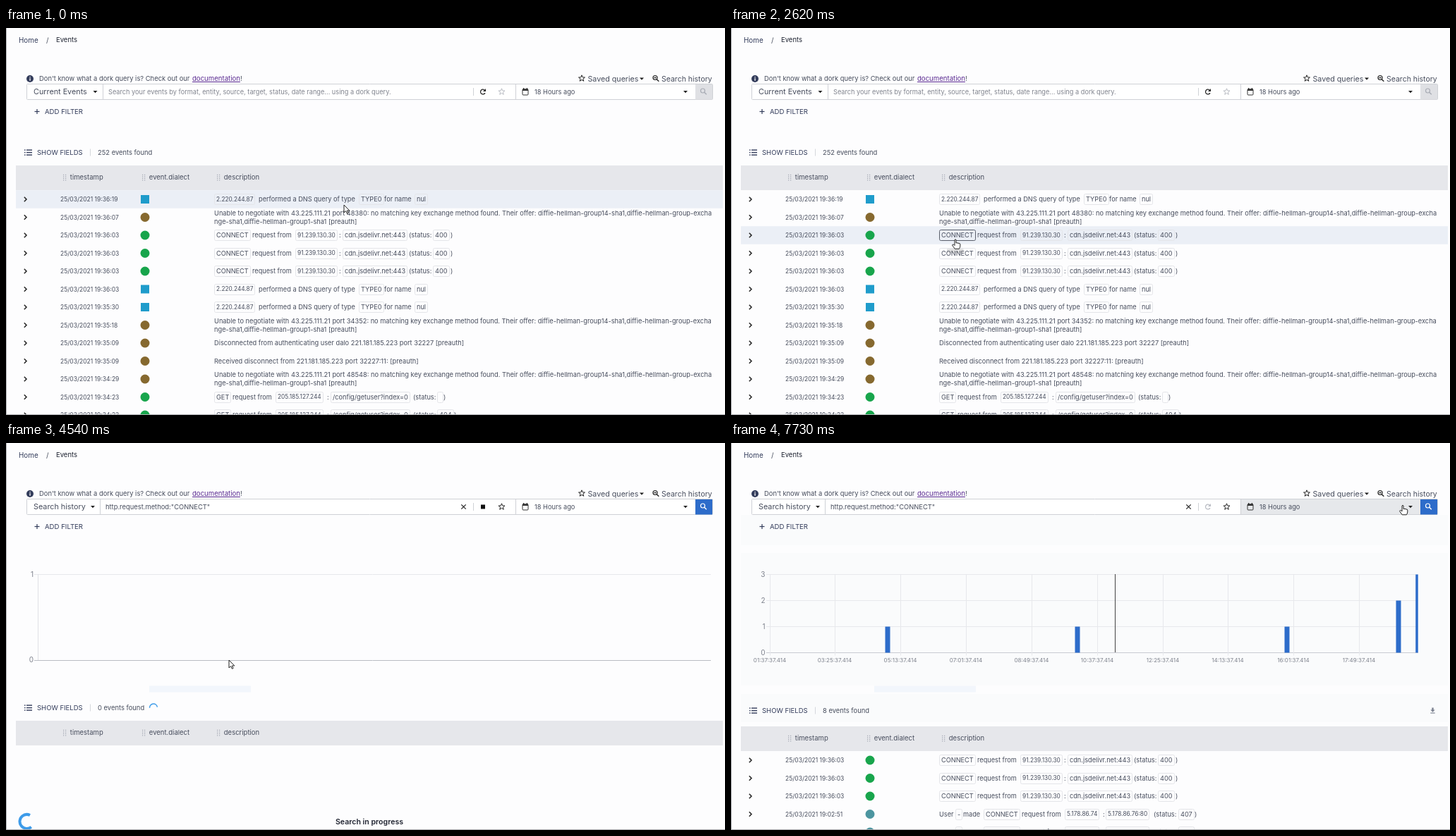
An HTML page with a canvas for the animation above (8000 ms loop, 1019 px wide and 549 px high).

```html
<!DOCTYPE html>
<html lang="en">
<head>
<meta charset="utf-8">
<title>Events</title>
<style>
html, body { margin: 0; width: 100%; height: 100%; overflow: hidden; background: #fdfdfe; }
canvas { display: block; width: 1019px; height: 549px; }
</style>
</head>
<body>
<canvas id="stage"></canvas>
<script>
const W = 1019, H = 549, LOOP = 8000;
const canvas = document.getElementById('stage');
const ctx = canvas.getContext('2d');
const dpr = window.devicePixelRatio || 1;
canvas.width = W * dpr;
canvas.height = H * dpr;

const INK = '#474d5d', NAVY = '#333c5b', BLUE = '#2d6cca', PALE = '#b9bcc3', SPIN = '#3d9be9';
const ROW = 25.5;

// Moments when the interface changes state
const ARM = 1800, CLICK = 3560, SEARCH = 3980, CLEAR = 4110, DONE = 5760;

// ---- drawing helpers ----
function rect(x, y, w, h, color) {
  ctx.fillStyle = color;
  ctx.fillRect(x, y, w, h);
}

function text(s, x, y, { size = 9.25, color = INK, weight = 400, align = 'left' } = {}) {
  ctx.font = `${weight} ${size}px Inter, "Open Sans", sans-serif`;
  ctx.textAlign = align;
  ctx.fillStyle = color;
  ctx.fillText(s, x, y + size * 0.36);
  return ctx.measureText(s).width;
}

function line(points, color, width = 1, close = false) {
  ctx.beginPath();
  points.forEach(([x, y], i) => i ? ctx.lineTo(x, y) : ctx.moveTo(x, y));
  if (close) ctx.closePath();
  ctx.strokeStyle = color;
  ctx.lineWidth = width;
  ctx.stroke();
}

function box(x, y, w, h, r, stroke, fill) {
  ctx.beginPath();
  ctx.roundRect(x, y, w, h, r);
  if (fill) { ctx.fillStyle = fill; ctx.fill(); }
  if (stroke) { ctx.strokeStyle = stroke; ctx.lineWidth = 1; ctx.stroke(); }
}

function disc(x, y, r, color) {
  ctx.beginPath();
  ctx.arc(x, y, r, 0, 7);
  ctx.fillStyle = color;
  ctx.fill();
}

function arc(x, y, r, from, to, color, width) {
  ctx.beginPath();
  ctx.arc(x, y, r, from, to);
  ctx.strokeStyle = color;
  ctx.lineWidth = width;
  ctx.stroke();
}

// ---- icons ----
function caret(x, y) {
  ctx.beginPath();
  ctx.moveTo(x - 3, y - 1.5);
  ctx.lineTo(x + 3, y - 1.5);
  ctx.lineTo(x, y + 1.8);
  ctx.fillStyle = '#222';
  ctx.fill();
}

function star(x, y, color) {
  const pts = [];
  for (let i = 0; i < 10; i++) {
    const a = i * Math.PI / 5 - Math.PI / 2, r = i % 2 ? 2 : 4.7;
    pts.push([x + r * Math.cos(a), y + r * Math.sin(a)]);
  }
  line(pts, color, 1, true);
}

function lens(x, y, color, plus) {
  arc(x - 1, y - 1, 3, 0, 7, color, 1.2);
  line([[x + 1.2, y + 1.2], [x + 4.3, y + 4.3]], color, 1.4);
  if (plus) {
    line([[x - 2.6, y - 1], [x + 0.6, y - 1]], color, 0.8);
    line([[x - 1, y - 2.6], [x - 1, y + 0.6]], color, 0.8);
  }
}

function refresh(x, y, color) {
  arc(x, y, 3.4, 0.5, 5.4, color, 1.3);
  ctx.beginPath();
  ctx.moveTo(x + 4, y - 4.5);
  ctx.lineTo(x + 4, y - 0.5);
  ctx.lineTo(x, y - 0.5);
  ctx.fillStyle = color;
  ctx.fill();
}

function calendar(x, y) {
  box(x - 4, y - 3.5, 8, 8, 1, '#333');
  rect(x - 4, y - 4, 8, 2.5, '#333');
  rect(x - 3, y - 5.5, 1.3, 2, '#333');
  rect(x + 1.7, y - 5.5, 1.3, 2, '#333');
}

function grip(x, y) {
  for (let i = 0; i < 8; i++) rect(x - 2 + (i % 2) * 3, y - 4.2 + (i >> 1) * 2.5, 1.2, 1.2, '#a4a8b3');
}

function download(x, y) {
  rect(x - 1.2, y - 4, 2.4, 3.5, '#7b8190');
  ctx.beginPath();
  ctx.moveTo(x - 3.2, y - 1);
  ctx.lineTo(x + 3.2, y - 1);
  ctx.lineTo(x, y + 2.2);
  ctx.fill();
  rect(x - 3.2, y + 3, 6.4, 1.1, '#7b8190');
}

// Circular loader: the dash grows, then its tail catches up
function spinner(x, y, r, width, phase, offset) {
  const p = (phase % 1 + 1) % 1;
  const ease = u => u * u * (3 - 2 * u);
  const grow = ease(Math.min(1, p * 2)), chase = ease(Math.max(0, p * 2 - 1));
  const tail = 0.12 * grow + 0.87 * chase;
  const len = Math.min(0.05 + 0.73 * grow, 1 - tail);
  const from = offset + (p + tail) * 2 * Math.PI;
  arc(x, y, r, from, from + Math.max(0.02, len) * 2 * Math.PI, SPIN, width);
}

// ---- table ----
const DNS = [[298, '2.220.244.87', 1], [358, 'performed a DNS query of type'], [503, 'TYPE0', 1], [536, 'for name'], [582, 'nul', 1]];
const CONNECT = [[298, 'CONNECT', 1], [349, 'request from'], [413, '91.239.130.30', 1], [472, ':'],
  [480, 'cdn.jsdelivr.net:443', 1], [571, '(status:'], [608, '400', 1], [630, ')']];
const get = (code, end) => [[298, 'GET', 1], [321, 'request from'], [385, '205.185.127.244', 1], [455, ':'],
  [463, '/config/getuser?index=0', 1], [577, '(status:'], [614, code, 1], [end, ')']];
const TUNNEL = [[295, 'User'], [321, '-', 1], [329, 'made'], [361, 'CONNECT', 1], [412, 'request from'], [476, '5.178.86.74', 1],
  [527, ':'], [534, '5.178.86.76:80', 1], [599, '(status:'], [637, '407', 1], [657, ')']];
const negotiate = port => [
  `Unable to negotiate with 43.225.111.21 port ${port}: no matching key exchange method found. Their offer: diffie-hellman-group14-sha1,diffie-hellman-group-excha`,
  'nge-sha1,diffie-hellman-group1-sha1 [preauth]'];

const EVENTS = [
  ['19:36:19', 'dns', DNS],
  ['19:36:07', 'ssh', negotiate(48380)],
  ['19:36:03', 'web', CONNECT],
  ['19:36:03', 'web', CONNECT],
  ['19:36:03', 'web', CONNECT],
  ['19:36:03', 'dns', DNS],
  ['19:35:30', 'dns', DNS],
  ['19:35:18', 'ssh', negotiate(34352)],
  ['19:35:09', 'ssh', ['Disconnected from authenticating user dalo 221.181.185.223 port 32227 [preauth]']],
  ['19:35:09', 'ssh', ['Received disconnect from 221.181.185.223 port 32227:11: [preauth]']],
  ['19:34:29', 'ssh', negotiate(48548)],
  ['19:34:23', 'web', get(' ', 620)],
  ['19:34:23', 'web', get('404', 635)],
];
const MATCHES = [...EVENTS.slice(2, 5), ['19:02:51', 'proxy', TUNNEL], ['19:01:31', 'proxy', TUNNEL]];
const BADGE = { ssh: '#86692f', web: '#18a54c', proxy: '#4c95a0' };

function badge(kind, y) {
  if (kind === 'dns') rect(191, y - 6, 12, 12, '#1f9ccb');
  else disc(197, y, 6.5, BADGE[kind]);
}

function row([time, kind, parts], y, armed) {
  line([[25.8, y - 3.2], [29, y], [25.8, y + 3.2]], '#222', 1.5);
  text('25/03/2021 ' + time, 77, y, { size: 8.5 });
  badge(kind, y);
  parts.forEach((part, i) => {
    if (typeof part === 'string') {
      text(part, 295, y + (parts.length > 1 ? i * 12 - 6 : 0));
      return;
    }
    const [x, s, chip] = part;
    const address = /^[\d.:]{7,}$/.test(s);
    const w = text(s, x, y, { size: address ? 8.3 : 9.2 });
    if (chip) box(x - 2.5, Math.round(y - 8) + 0.5, Math.round(w + 5), 15, 2, armed && !i ? '#5a5f6b' : '#e4e5e9');
  });
}

function table(top, rows, hover, armed) {
  rect(14, top, 1002, 35, '#e6e7eb');
  [[83, 'timestamp'], [195, 'event.dialect'], [301, 'description']].forEach(([x, s]) => {
    grip(x, top + 17);
    text(s, x + 7.8, top + 17, { size: 9.5 });
  });
  rows.forEach((r, i) => {
    const y = top + 48 + i * ROW;
    if (y > H + 8) return;
    if (i === hover) rect(14, y - 12.75, 1002, ROW, '#ebeff6');
    row(r, y, armed && i === hover);
  });
}

function toolbar(y, label) {
  for (let i = -1; i < 2; i++) {
    rect(26, y - 0.6 + i * 3.5, 1.6, 1.4, NAVY);
    rect(29, y - 0.6 + i * 3.5, 8, 1.4, NAVY);
  }
  text('SHOW FIELDS', 44, y, { size: 9.5, color: NAVY });
  rect(119, y - 5, 1, 10, '#d5d7dc');
  text(label, 130, y, { size: 9.4 });
}

// ---- chart ----
const BEFORE = { start: [36, 31.102], max: 15, step: 5,
  bars: [[156.5, 3], [166, 1], [268, 1], [314.5, 1], [370, 1], [714, 1], [779, 1], [900, 4], [972.5, 11]] };
const AFTER = { start: [37, 37.414], max: 3, step: 1,
  bars: [[222, 1], [491, 1], [788, 1], [946, 2], [972, 3]] };
const AXIS = { size: 8, color: '#7d818c' };

function chart({ start, max, step, bars }) {
  const top = 186.5, base = 297.5, k = (base - top) / max;
  for (let v = 0; v <= max; v += step) {
    const y = Math.round(base - v * k - 0.5) + 0.5;
    line([[50, y], [974, y]], v ? '#e7e8ec' : '#c9cbd2');
    text(String(v), 48.5, y - 0.5, { ...AXIS, size: 10, align: 'right' });
  }
  for (let i = 0; i < 10; i++) {
    const x = Math.round(54.5 + i * 92.85) + 0.5, min = 60 + start[0] + i * 108;
    line([[x, top], [x, base + 4]], '#e7e8ec');
    const pad = n => String(n).padStart(2, '0');
    text(`${pad(Math.floor(min / 60))}:${pad(min % 60)}:${start[1]}`, x - 0.5, 308.5, { ...AXIS, align: 'center' });
  }
  for (const [x, v] of bars) {
    const w = x > 971 ? 3.5 : 7;
    rect(x - w / 2, base - v * k, w, v * k, BLUE);
  }
}

function emptyChart() {
  line([[40, 186.5], [999, 186.5]], '#e7e8ec');
  line([[45.5, 186], [45.5, 308]], '#e0e1e6');
  line([[40, 308.5], [999, 308.5]], '#b9bcc3');
  text('1', 39, 186, { ...AXIS, size: 10, align: 'right' });
  text('0', 39, 307.5, { ...AXIS, size: 10, align: 'right' });
}

// ---- page header and search bar ----
function header() {
  text('Home', 18, 17, { size: 9.9, color: NAVY });
  text('/', 57, 17, { size: 9.9 });
  text('Events', 71, 17, { size: 9.5, color: '#1d2230' });
  disc(34, 72, 5, NAVY);
  rect(33.4, 71.2, 1.3, 3.6, '#fff');
  rect(33.4, 69, 1.3, 1.3, '#fff');
  text("Don't know what a dork query is? Check out our", 47, 72, { size: 9.4 });
  const w = text('documentation', 264, 72, { size: 9.6, color: '#5a2a91' });
  rect(264, 76, w, 1, '#5a2a91');
  text('!', 264 + w, 72, { size: 9.6 });
  star(816, 71.5, '#222');
  text('Saved queries', 824.5, 72, { size: 10.7 });
  caret(901, 72);
  lens(921, 71.5, '#222', true);
  text('Search history', 929, 72, { size: 10.5 });
  line([[40.5, 118.5], [47.5, 118.5]], NAVY, 1.2);
  line([[44, 115], [44, 122]], NAVY, 1.2);
  text('ADD FILTER', 55, 119, { size: 9.6, color: NAVY });
}

function searchBar(t, dateHover) {
  const active = t >= SEARCH;
  box(29.5, 79.5, 972, 22, 1, '#cfd1d6', '#fff');
  if (dateHover) rect(723, 80, 254, 21, '#e6e8eb');
  const sep = active ? 133.5 : 137.5;
  line([[sep, 80], [sep, 101]], '#cfd1d6');
  line([[722.5, 80], [722.5, 101]], '#cfd1d6');
  line([[662.5, 85], [662.5, 96]], '#cfd1d6');
  text(active ? 'Search history' : 'Current Events', 39, 90.5, { size: 10.8 });
  caret(active ? 123 : 126.5, 90.5);
  if (t < CLICK) {
    text('Search your events by format, entity, source, target, status, date range... using a dork query.', 145, 90.5,
      { size: 9.2, color: '#80848e' });
  } else {
    text('http.request.method:"CONNECT"', active ? 141 : 145, 90.5, { size: 9.4 });
  }
  if (active) {
    line([[645.3, 87.3], [651.7, 93.7]], '#222', 1.2);
    line([[651.7, 87.3], [645.3, 93.7]], '#222', 1.2);
  }
  if (active && t < DONE) rect(673, 87.5, 6, 6, '#111');
  else refresh(676, 90.5, active ? PALE : '#222');
  star(702.5, 90.5, active ? '#222' : PALE);
  calendar(736, 90.5);
  text('18 Hours ago', 749, 90.5);
  caret(963, 90.5);
  rect(977, 80, 24, 21.5, active ? BLUE : '#dfe0e4');
  lens(988.5, 90, active ? '#fff' : '#a9acb5');
}

// ---- tooltip and pointer ----
function tooltip(x, y, scale, alpha) {
  ctx.save();
  ctx.globalAlpha = alpha;
  ctx.translate(x, y);
  ctx.scale(scale, scale);
  box(-32.5, -8.5, 65, 17, 2, null, '#616161');
  text('Filter for value', 0, 0, { size: 7.9, weight: 500, color: '#fff', align: 'center' });
  ctx.restore();
}

function pointer(x, y, hand) {
  ctx.save();
  ctx.translate(x, y);
  ctx.lineJoin = 'round';
  const shape = new Path2D(hand
    ? 'M-1 1Q0-.5 1 1V5.5Q2 4.7 3 5.7Q4 5 5 6.1Q6.6 5.6 6.8 7.2V10Q6.6 12 5.4 13.8H-.8Q-2.6 11.2-4.4 8.6Q-4 6.8-2.2 7.8L-1 9Z'
    : 'M0 0V11L2.6 8.6L4.4 12.3L6.1 11.5L4.3 8H7.8Z');
  ctx.fillStyle = '#fff';
  ctx.fill(shape);
  ctx.strokeStyle = '#222';
  ctx.lineWidth = 1;
  ctx.stroke(shape);
  ctx.restore();
}

// ---- motion ----
// Progress in n hard steps, the first at a and the last at b
function steps(t, a, b, n) {
  if (t < a) return 0;
  return Math.min(1, (Math.floor((t - a) / (b - a) * (n - 1) + 1e-6) + 1) / n);
}
const bend = (a, b, c, s) => (1 - s) * (1 - s) * a + 2 * s * (1 - s) * b + s * s * c;

const swoop = t => {
  const s = Math.sin(steps(t, 580, 1500, 7) * Math.PI / 2);
  return [bend(479, 400, 314.5, s), bend(251, 126, 285, s)];
};
const leave = s => [bend(316, 670, 952, s), bend(308, 140, 88, s)];

function cursor(t) {
  if (t < 1640) return swoop(t);
  if (t < ARM) return [316, 293];
  if (t < SEARCH) return [318, 299.5];
  return leave(steps(t, 7040, 7730, 6));
}

function hoverRow(t) {
  if (t >= 1640) return 2;
  return Math.floor((swoop(t - 155)[1] - 230.25) / ROW);
}

function draw(t) {
  const [cx, cy] = cursor(t);
  const dateHover = t > 7040 && cx > 722 && cy < 101;
  const armed = t >= ARM && t < SEARCH;
  ctx.setTransform(dpr, 0, 0, dpr, 0, 0);
  rect(0, 0, W, H, '#fdfdfe');
  if (t >= DONE) [[102, 43], [156, 188], [356, 40]].forEach(([y, h]) => rect(14, y, 1002, h, '#fafbfc'));
  header();
  searchBar(t, dateHover);

  if (t < SEARCH) {
    toolbar(176.5, '252 events found');
    table(195, EVENTS, hoverRow(t), armed);
  } else if (t < CLEAR) {
    chart(BEFORE);
    toolbar(375.5, '0 events found');
    disc(213.5, 377, 0.9, SPIN);
    table(394, EVENTS, -1);
  } else if (t < DONE) {
    rect(203, 344.5, 144, 9, '#f2f6fc');
    emptyChart();
    toolbar(375.5, '0 events found');
    spinner(209, 375.5, 5.5, 1.5, (t - 4910) / 1400, 1.5);
    table(394, [], -1);
    spinner(29.5, 537, 10, 4, (t - 5400) / 1400, -2.2);
    text('Search in progress', 515, 537, { size: 10.6, weight: 600, color: '#1f2330', align: 'center' });
  } else {
    rect(203, 344.5, 144, 9, '#f2f6fc');
    chart(AFTER);
    const s = steps(t, 7040, 7730, 6);
    if (s > 0) {
      const x = Math.round(leave(Math.min(s, 1 / 3))[0]) + 0.5;
      line([[x, 186], [x, 297]], '#444');
    }
    toolbar(379.5, '8 events found');
    download(994.5, 379.5);
    table(402, MATCHES, -1);
  }

  rect(0, 0, 1, H, '#b4b5b8');
  rect(0, H - 1, W, 1, '#a9aaad');

  if (t >= 2620 && t < SEARCH) {
    const s = Math.min(1, steps(t, 2620, 3290, 6) * 1.5);
    tooltip(319 - 4.5 * s, 311 + 21 * s, 0.15 + 0.85 * s, 0.8 * s);
  } else if (t >= SEARCH && t < CLEAR) {
    tooltip(314.5, 332, 1, 0.2);
  }
  pointer(cx, cy, armed || dateHover);
}

function frame(now) {
  draw(now % LOOP);
  requestAnimationFrame(frame);
}
requestAnimationFrame(frame);
</script>
</body>
</html>
```
